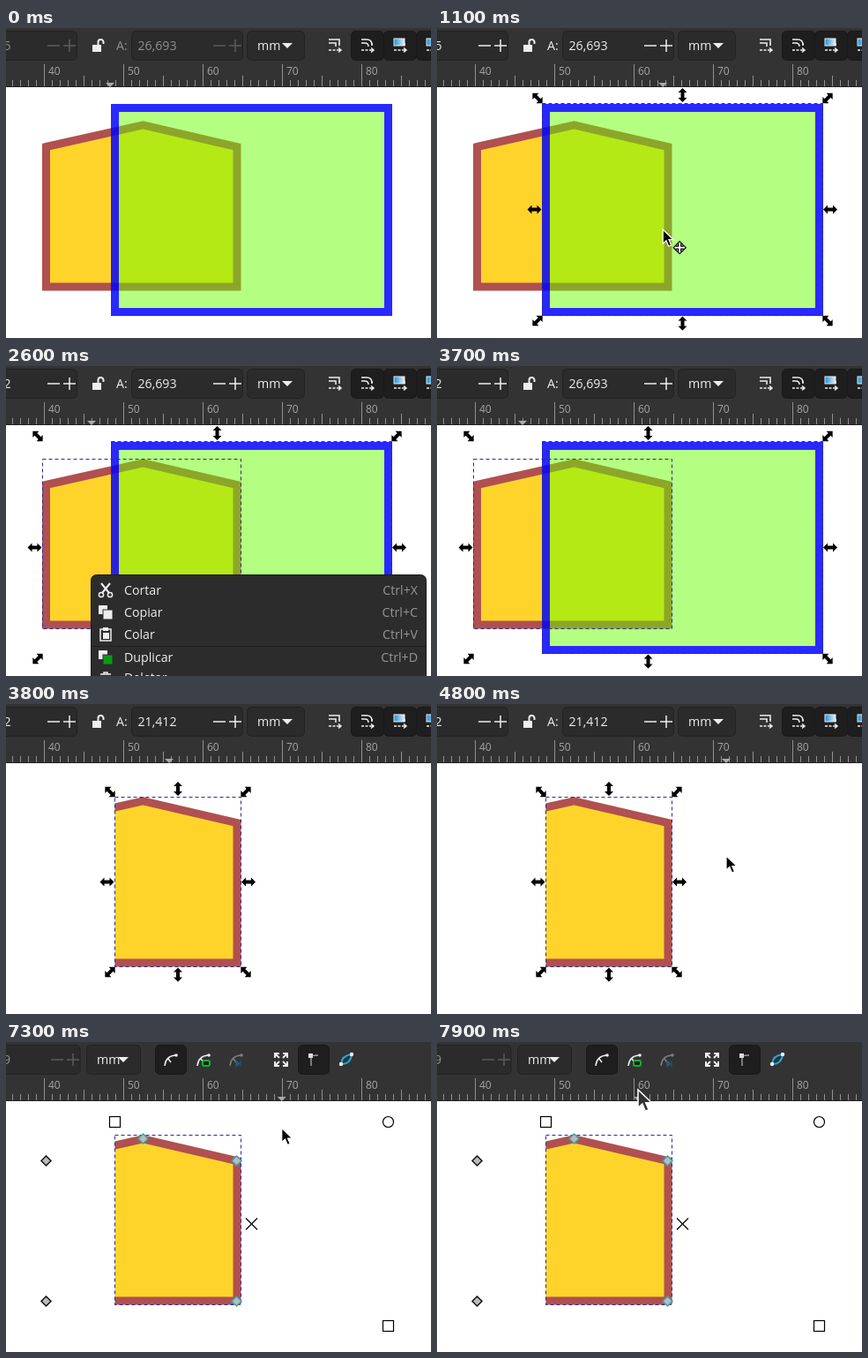
Write an HTML page that moves like this. It is 482 by 351 pixels and loops after 8000 ms.

```html
<!DOCTYPE html>
<html lang="pt">
<head>
<meta charset="utf-8">
<style>
html, body { margin: 0; width: 100%; height: 100%; overflow: hidden; background: #fff; }
svg { display: block; width: 482px; height: 351px; }
text { font-family: "Open Sans", "Noto Sans", sans-serif; font-size: 14.2px; fill: #eee; }
.ruler text { font-size: 12px; fill: #a5a5a5; }
.field { fill: #2b2b2b; stroke: #222; }
.pressed { fill: #1e1e1e; stroke: #191919; }
.line { fill: none; stroke: #eee; stroke-width: 1.5; }
.off text { fill: #919191; }
.off .line { stroke: #5c5c5c; }
.dash { fill: none; stroke: #2b2b94; stroke-dasharray: 4 3; }
.key { fill: #959595; text-anchor: end; }
</style>
</head>
<body>
<svg id="stage" viewBox="0 0 482 351"></svg>
<script>
const LOOP = 8000, STEP = 100;
const stage = document.getElementById('stage');
const at = (x, y, body, extra = '') => `<g transform="translate(${x} ${y})${extra}">${body}</g>`;
const box = (x, y, w, h, attrs) => `<rect x="${x}" y="${y}" width="${w}" height="${h}" ${attrs}/>`;
const path = (d, attrs = 'class="line"') => `<path d="${d}" ${attrs}/>`;
const label = (x, y, s, attrs = '') => `<text x="${x}" y="${y}" ${attrs}>${s}</text>`;
const layer = (id, body, attrs = '') => `<g id="${id}" ${attrs}>${body}</g>`;

// Drawing
const HOUSE = 'M45.5 134.5 155.5 109.8 262 134.5V293H45.5Z';
const house = path(HOUSE, 'fill="#ffd42a" stroke="#b05050" stroke-width="9"');
const frame =
  box(128, 95, 301, 222, 'fill="#6f0" fill-opacity=".49"') +
  box(123.5, 90.5, 310, 231, 'fill="none" stroke="#00f" stroke-opacity=".84" stroke-width="9"');

// Selection marks
const ARROW = 'M-8 0-3-5V-2H3V-5L8 0 3 5V2H-3V5Z';
function handles([l, t, r, b]) {
  const cx = (l + r) / 2, cy = (t + b) / 2;
  return [
    [l - 5.5, t - 6, 45], [r + 5.5, t - 6, -45], [l - 5.5, b + 6, -45], [r + 5.5, b + 6, 45],
    [cx, t - 9.5, 90], [cx, b + 9, 90], [l - 9, cy, 0], [r + 8.5, cy, 0]
  ].map(([x, y, a]) => at(x, y, path(ARROW, ''), ` rotate(${a})`)).join('');
}
const dashed = ([l, t, r, b]) => box(l, t, r - l, b - t, 'class="dash"');
const HOUSE_BOX = [41.5, 105.5, 266.5, 297.5];
const FRAME_BOX = [119.5, 85.5, 437.5, 325.5];
const BOTH_BOX = [41.5, 85.5, 437.5, 325.5];
const CLIP_BOX = [123.5, 105.5, 266.5, 297.5];

const diamond = (x, y, edge) =>
  at(x, y, path('M0-5.5 5.5 0 0 5.5-5.5 0Z', `fill="#bbb" stroke="${edge}" stroke-width="1.5"`));
const nodes =
  [[45.5, 134.5], [45.5, 293.5]].map(p => diamond(...p, '#111')).join('') +
  [[155.5, 109.5], [261.5, 134.5], [261.5, 293.5]].map(p => diamond(...p, '#35a3b5')).join('') +
  `<g fill="#fff" stroke="#000" stroke-width="1.2">` +
  box(117.5, 84.5, 12, 12, '') + box(427.5, 315.5, 12, 12, '') +
  `<circle cx="433.5" cy="90.5" r="6"/>` + path('M272 199.5l13 13m0-13l-13 13', '') + '</g>';

// Ruler
function ruler() {
  let ticks = '', labels = '';
  for (let mm = 36; mm < 90; mm++) {
    const x = 43.5 + (mm - 40) * 9;
    const top = mm % 10 === 0 ? 41 : mm % 5 === 0 ? 54 : 59;
    ticks += `M${Math.floor(x) + .5} ${top}V66`;
    if (mm % 10 === 0) labels += label(x + 4.5, 53, mm);
  }
  return `<g class="ruler">${path(ticks, 'fill="none" stroke="#919191"')}${labels}` +
    path('M0 66.5H482', 'stroke="#222"') + '</g>';
}

// Toolbars
const spin = right => path(`M${right - 32} 20h14m4 0h14m-7-7v14`);
const unit = (x, w) => box(x + .5, 3.5, w, 33, 'class="field" rx="5"') +
  label(x + 12, 25, 'mm') + path(`M${x + w - 25} 17h12l-6 6Z`, 'fill="#eee"');
const pressed = (x, w = 37) => box(x + .5, 3.5, w, 33, 'class="pressed" rx="5"');
const scaleMark = path('M-6 6H2M6-2V2', 'class="line" stroke-dasharray="3 1.5"') +
  path('M3 6h4M5 3.5 8 6 5 8.5', 'class="line"');
const gradient = box(-6, -7, 12, 8, 'fill="url(#blue)" stroke="#eee"');

const selectBar =
  layer('fields',
    box(-60, 3.5, 140.5, 33, 'class="field" rx="5"') + label(-2.5, 25, '5', 'id="width"') + spin(79) +
    box(142.5, 3.5, 126, 33, 'class="field" rx="5"') +
    label(149.5, 25, '26,693', 'id="height"') + spin(267) +
    label(125, 25, 'A:')) +
  box(98, 19, 10, 8, 'fill="#eee"') + path('M104.5 19V16a3 3 0 0 1 6 0V18', 'class="line" style="stroke-width:2"') +
  unit(273, 65) + pressed(391) + pressed(428) + pressed(465) +
  at(372, 19, path('M-6-6H6V-1M-6-2H2V2') + scaleMark) +
  at(409, 19, path('M-6-6H0Q6-6 6 0M-6-2H-2Q2-2 2 2') + scaleMark) +
  at(446, 19, gradient + scaleMark) +
  at(483, 19, gradient + scaleMark);

const curve = path('M-7 7Q-6-4 5-5M-3-1 0 3') + '<circle cx="6" cy="-5" r="1.8" fill="#eee"/>';
const nodeBar =
  `<g class="off">` + box(-60, 3.5, 144, 33, 'class="field" rx="5"') + label(-3, 25, '9') + spin(83) + '</g>' +
  unit(91, 61) + pressed(169, 35) + pressed(331, 35) +
  at(187, 20, curve) +
  at(224, 20, curve + box(-1, 1, 8, 6, 'rx="2" fill="#1d1d1d" stroke="#0bb52c" stroke-width="2"')) +
  at(261, 20, `<g opacity=".4">${curve}</g>` + path('M0 1v7l4-3.500zM5 1v7', 'fill="#235d87" stroke="#235d87"')) +
  at(312, 20, path('M-7-2V-7H-2M2-7H7V-2M7 2V7H2M-2 7H-7V2M-6-6-2-2M6-6 2-2M6 6 2 2M-6 6-2 2',
    'class="line" style="stroke-width:2"')) +
  at(349, 20, path('M-3 7V-3Q-3-5 5-5', 'class="line" style="stroke:#999"') + box(-6, -7, 5, 5, 'fill="#ddd"')) +
  at(386, 20, path('M-6 5Q-5-5 6-6Q5 5-6 5', 'fill="none" stroke="#23a7df" stroke-width="2"') +
    '<circle cx="-6" cy="5" r="2.2" fill="#eee"/><circle cx="6" cy="-6" r="2.2" fill="#eee"/>');

// Context menu
const sheets = color => box(-8, -8, 10, 10, 'fill="#eee"') +
  box(-3, -3, 11, 11, `fill="${color}" stroke="#2c2c2c"`);
const icons = [
  path('M-5-8 4 3M5-8-4 3', 'class="line" style="stroke-width:2"') +
    '<circle class="line" cx="-5" cy="5" r="2.6"/><circle class="line" cx="5" cy="5" r="2.6"/>',
  sheets('#eee'),
  box(-6, -6, 12, 13, 'class="line"') + box(-3, -8, 6, 4, 'fill="#eee"') + box(-3, -2, 7, 7, 'fill="#eee"'),
  sheets('#0b9a17'),
  path('M-6-4H6M-2-4V-6H2V-4M-5-2V8H5V-2')
];
const rows = [['Cortar', 'X', 254], ['Copiar', 'C', 279], ['Colar', 'V', 304],
  ['Duplicar', 'D', 330], ['Deletar', '', 353]];
const menu =
  box(96.5, 236.500, 380, 140, 'rx="6" fill="#2c2c2c" stroke="#1c1c1c"') +
  box(97, 0, 379, 25, 'id="hover" fill="#454545"') +
  path('M97 317.5H476', 'stroke="#1d1d1d"') +
  rows.map(([name, key, y], i) => at(113, y, icons[i]) + label(134, y + 5, name) +
    (key && label(467, y + 5, 'Ctrl+' + key, 'class="key"'))).join('');

// Pointer
const POINTER = 'M0 0V16L3.800 12.500 6.500 19 9.500 17.800 6.800 11.500H12Z';
const moveIcon = at(19, 20.500, path('M0-7 3-4H1.500V-1.500H4V-3L7 0 4 3V1.500H1.500V4H3L0 7-3 4H-1.500V1.500H-4V3L-7 0-4-3V-1.500H-1.500V-4H-3Z',
  'fill="#fff" stroke="#000" stroke-width="1.2"'));

stage.innerHTML =
  `<defs><clipPath id="crop"><rect x="123.5" y="90.5" width="310" height="231"/></clipPath>
   <linearGradient id="blue"><stop stop-color="#1692e0"/><stop offset="1" stop-color="#eee"/></linearGradient></defs>` +
  box(0, 0, 482, 351, 'fill="#fff"') +
  layer('plain', house + frame) +
  layer('clipped', `<g clip-path="url(#crop)">${house}</g>` + dashed(CLIP_BOX)) +
  layer('oneSelected', dashed(FRAME_BOX) + handles(FRAME_BOX)) +
  layer('bothSelected', dashed(HOUSE_BOX) + dashed(FRAME_BOX) + handles(BOTH_BOX)) +
  layer('clipSelected', handles(CLIP_BOX)) +
  layer('nodes', nodes) +
  box(0, 0, 482, 67, 'fill="#333"') + ruler() +
  layer('marker', path('M-5 62H5L0 67Z', 'fill="#aaa"')) +
  layer('selectBar', selectBar) + layer('nodeBar', nodeBar) +
  layer('menu', menu) +
  layer('pointer', path(POINTER, 'id="arrow" stroke="#fff" stroke-width="1.2"') + layer('moveIcon', moveIcon));

const ui = {};
stage.querySelectorAll('[id]').forEach(el => ui[el.id] = el);
const show = (name, on) => ui[name].style.display = on ? '' : 'none';
const move = (name, x, y, s = 1) => ui[name].setAttribute('transform', `translate(${x} ${y}) scale(${s})`);

// Pointer route: time, x, y
const route = [
  [0, 118, 150], [100, 118, 150], [1000, 256, 228], [1500, 257, 229], [1900, 96, 234], [2300, 96, 234],
  [2400, 98, 268], [2500, 99, 322], [2600, 97, 360], [3700, 97, 360], [3800, 185, 356], [4500, 197, 286],
  [4800, 328, 172], [6300, 328, 172], [6400, 333, 130], [6900, 341, 112], [7100, 341, 112], [7900, 228, 54]
];
function pointerAt(t) {
  const i = route.findIndex(k => k[0] > t);
  if (i < 0) return route[route.length - 1].slice(1);
  const [a, b] = [route[i - 1], route[i]];
  const p = (t - a[0]) / (b[0] - a[0]);
  return [1, 2].map(n => a[n] + (b[n] - a[n]) * p);
}

function draw(time) {
  const t = Math.floor(time % LOOP / STEP) * STEP;
  const during = (from, to) => t >= from && t < to;
  const [x, y] = pointerAt(t);
  const cropped = t >= 3800, editing = t >= 7200, menuOpen = during(2200, 3700);

  show('plain', !cropped);
  show('clipped', cropped);
  show('oneSelected', during(1100, 1900));
  show('bothSelected', during(1900, 3800));
  show('clipSelected', cropped && !editing);
  show('nodes', editing);
  show('selectBar', !editing);
  show('nodeBar', editing);
  ui.fields.setAttribute('class', t < 1100 ? 'off' : '');
  ui.width.textContent = t < 1900 ? '5' : '2';
  ui.height.textContent = cropped ? '21,412' : '26,693';

  show('menu', menuOpen);
  const hovered = rows.find(row => Math.abs(y - row[2]) <= 12.5);
  show('hover', during(2400, 2600) && hovered);
  if (hovered) ui.hover.setAttribute('y', hovered[2] - 12.5);

  const overSelection = during(1100, 2200) ||
    (cropped && !editing && x > 123 && x < 266 && y > 105 && y < 297);
  const onBar = y < 62;
  show('pointer', t >= 200 && !during(2600, 3800));
  show('moveIcon', overSelection);
  move('pointer', x, y, onBar ? 1.28 : 1);
  ui.arrow.setAttribute('fill', onBar ? '#333' : '#000');
  move('marker', during(2200, 3800) ? 97 : x, 0);
}

function tick(now) {
  draw(now);
  requestAnimationFrame(tick);
}
draw(0);
requestAnimationFrame(tick);
</script>
</body>
</html>
```
